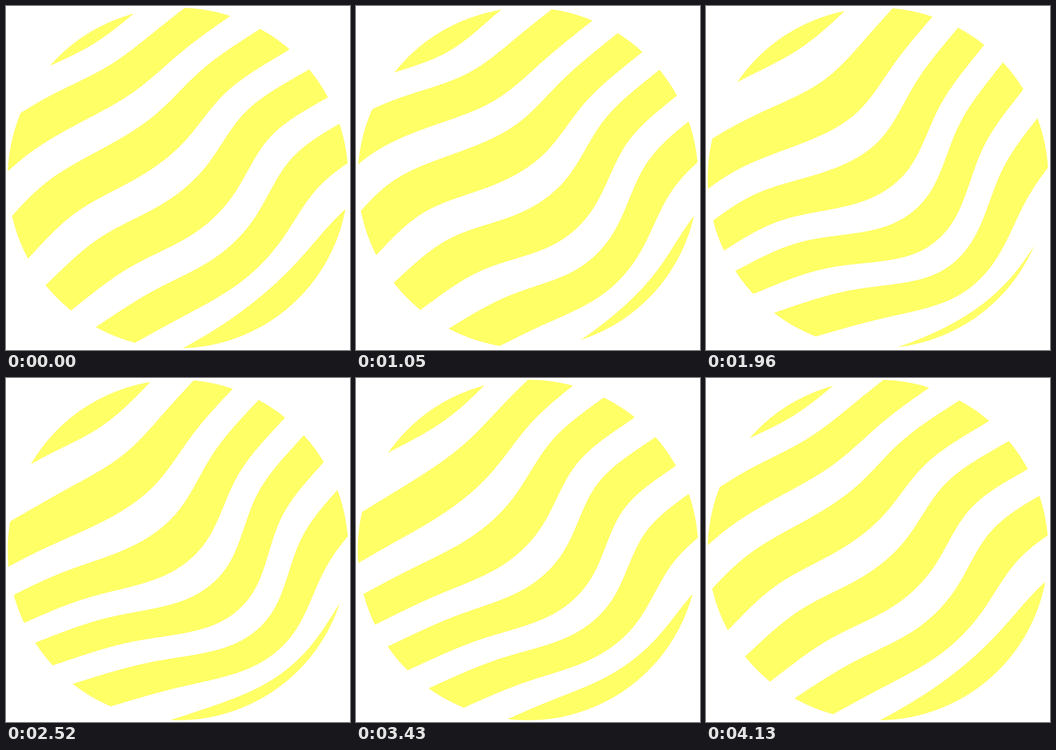
Recreate the animation shown at these times as an HTML page with a canvas. Size 748x748 px, loop 4.2 s.

```html
<!DOCTYPE html>
<html lang="en">
<head>
<meta charset="utf-8">
<title>Wavy disc</title>
<style>
  html, body { margin: 0; width: 100%; height: 100%; overflow: hidden; background: #fff; }
  canvas { display: block; width: 748px; height: 748px; }
</style>
</head>
<body>
<canvas id="stage" width="748" height="748"></canvas>
<script>
const SIZE = 748, LOOP = 4200, STEP = 70;
const ctx = document.getElementById('stage').getContext('2d');

// Diagonal axes: d = x - y runs along the waves, s = x + y - SIZE across them.
const D0 = -480, GAP = 190;

// Each pose holds four guide waves, given as s at six even steps of d.
const poses = [
  { t: 0, waves: [
    [-640, -590, -545, -480, -452, -435],
    [-276, -276, -228, -187, -184, -153],
    [60, 92, 152, 156, 112, 142],
    [342, 400, 435, 441, 431, 455]] },
  { t: 700, waves: [
    [-690, -622, -542, -453, -427, -400],
    [-292, -295, -234, -173, -152, -120],
    [80, 109, 170, 174, 125, 146],
    [388, 448, 474, 464, 427, 440]] },
  { t: 1400, waves: [
    [-620, -590, -534, -454, -430, -415],
    [-282, -266, -177, -109, -128, -135],
    [31, 99, 223, 235, 158, 135],
    [388, 451, 492, 495, 461, 450]] },
  { t: 1960, waves: [
    [-590, -558, -515, -456, -436, -438],
    [-270, -227, -128, -79, -123, -150],
    [-1, 97, 237, 252, 168, 128],
    [328, 427, 492, 504, 470, 450]] },
  { t: 2520, waves: [
    [-590, -540, -497, -438, -425, -430],
    [-268, -198, -111, -85, -132, -150],
    [0, 106, 234, 250, 160, 128],
    [305, 402, 481, 496, 459, 442]] },
  { t: 3430, waves: [
    [-600, -568, -518, -465, -453, -460],
    [-270, -211, -153, -147, -185, -171],
    [16, 95, 189, 195, 123, 132],
    [298, 372, 448, 471, 452, 462]] }
];

// Edges sit at k ± HALF for the white bands k = 0..4.
const HALF = 0.225;
const guides = [-HALF, 1 + HALF, 3 - HALF, 4 + HALF];

function pose(i) {
  const n = poses.length, j = ((i % n) + n) % n;
  return { t: poses[j].t + Math.floor(i / n) * LOOP, waves: poses[j].waves };
}

// Smooth periodic motion through the poses.
function wavesAt(t) {
  let i = poses.length - 1;
  while (poses[i].t > t) i--;
  const [a, b, c, e] = [i - 1, i, i + 1, i + 2].map(pose);
  const h = c.t - b.t, u = (t - b.t) / h;
  const slope = (p, q, r, vp, vq, vr) => {
    const h1 = q.t - p.t, h2 = r.t - q.t;
    return ((vq - vp) / h1 * h2 + (vr - vq) / h2 * h1) / (h1 + h2);
  };
  return b.waves.map((row, w) => row.map((vb, k) => {
    const va = a.waves[w][k], vc = c.waves[w][k], ve = e.waves[w][k];
    const mb = slope(a, b, c, va, vb, vc) * h;
    const mc = slope(b, c, e, vb, vc, ve) * h;
    const u2 = u * u, u3 = u2 * u;
    return (2 * u3 - 3 * u2 + 1) * vb + (u3 - 2 * u2 + u) * mb
         + (3 * u2 - 2 * u3) * vc + (u3 - u2) * mc;
  }));
}

function blend(waves, p) {
  const weights = guides.map((g, i) => guides.reduce(
    (w, o, j) => j === i ? w : w * (p - o) / (g - o), 1));
  return waves[0].map((_, k) => weights.reduce((sum, w, i) => sum + w * waves[i][k], 0));
}

// Natural cubic spline on an even grid, straight beyond its ends.
function spline(v) {
  const n = v.length, m = Array(n).fill(0), c = Array(n).fill(0), r = Array(n).fill(0);
  for (let i = 1; i < n - 1; i++) {
    const q = 4 - c[i - 1];
    c[i] = 1 / q;
    r[i] = (6 * (v[i - 1] - 2 * v[i] + v[i + 1]) - r[i - 1]) / q;
  }
  for (let i = n - 2; i > 0; i--) m[i] = r[i] - c[i] * m[i + 1];
  return x => {
    if (x < 0) return v[0] + x * (v[1] - v[0] - m[1] / 6);
    if (x > n - 1) return v[n - 1] + (x - n + 1) * (v[n - 1] - v[n - 2] + m[n - 2] / 6);
    const i = Math.min(n - 2, Math.floor(x)), b = x - i, a = 1 - b;
    return a * v[i] + b * v[i + 1] + ((a ** 3 - a) * m[i] + (b ** 3 - b) * m[i + 1]) / 6;
  };
}

function edge(waves, p) {
  const f = spline(blend(waves, p)), pts = [];
  for (let d = -560; d <= 560; d += 7) {
    const s = f((d - D0) / GAP) + SIZE;
    pts.push([(s + d) / 2, (s - d) / 2]);
  }
  return pts;
}

function draw(t) {
  ctx.fillStyle = '#fff';
  ctx.fillRect(0, 0, SIZE, SIZE);
  ctx.fillStyle = '#ffff66';
  ctx.beginPath();
  ctx.arc(SIZE / 2, SIZE / 2, 370.3, 0, Math.PI * 2);
  ctx.fill();

  const waves = wavesAt(t);
  ctx.fillStyle = '#fff';
  for (let k = 0; k < 5; k++) {
    ctx.beginPath();
    for (const [x, y] of edge(waves, k - HALF)) ctx.lineTo(x, y);
    for (const [x, y] of edge(waves, k + HALF).reverse()) ctx.lineTo(x, y);
    ctx.fill();
  }
}

const start = performance.now();
function tick() {
  const t = (performance.now() - start) % LOOP;
  draw(Math.floor(t / STEP) * STEP);
  requestAnimationFrame(tick);
}
tick();
</script>
</body>
</html>
```
